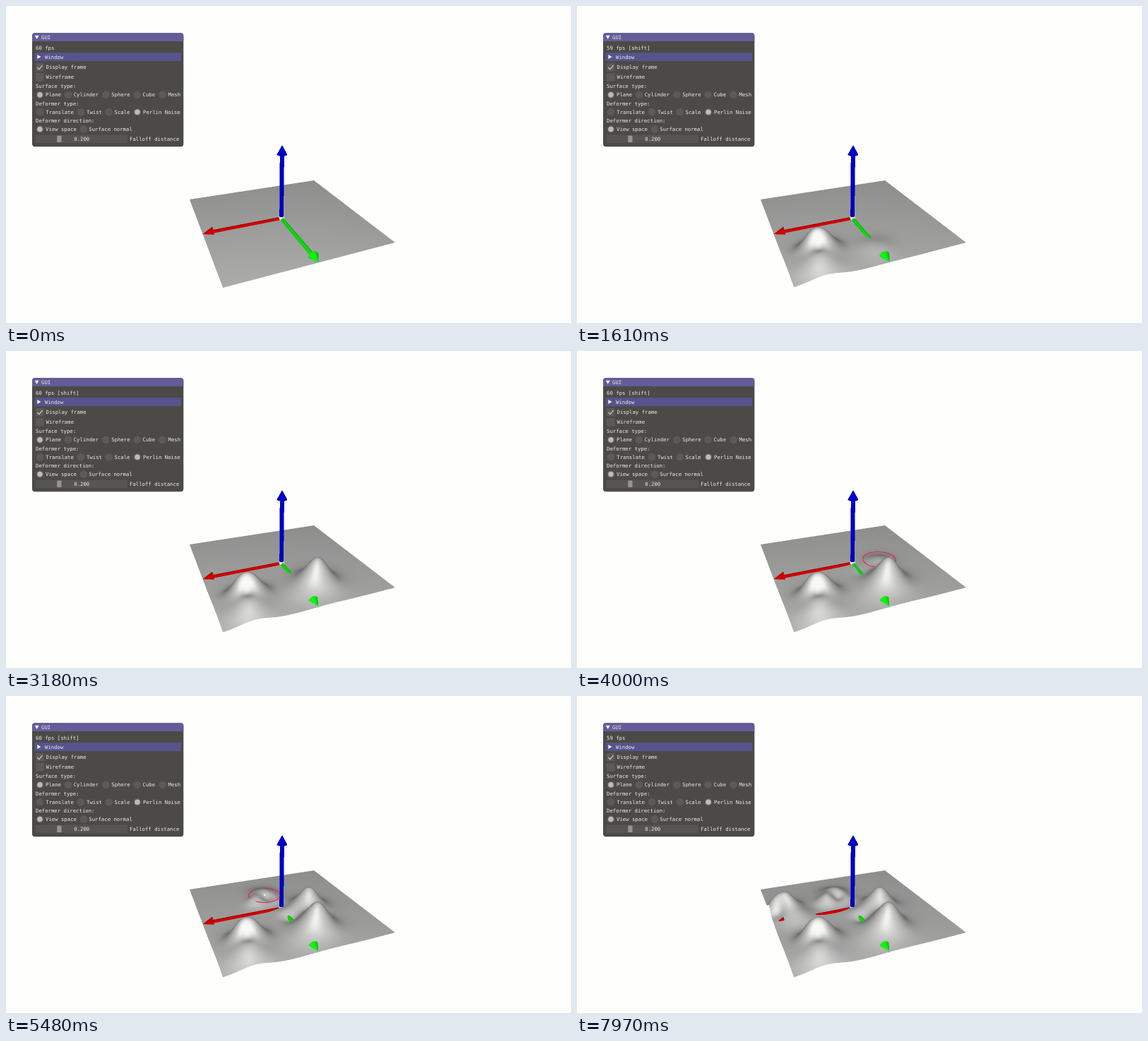
An HTML page with a canvas that plays this animation: 800 px wide and 449 px high, repeating every 8000 ms.

```html
<!DOCTYPE html>
<html lang="en">
<head>
<meta charset="utf-8">
<title>Surface deformer</title>
<style>
html, body { margin: 0; width: 100%; height: 100%; overflow: hidden; background: #fefefd; }
canvas { display: block; }
</style>
</head>
<body>
<canvas id="stage" width="800" height="449"></canvas>
<script>
const LOOP = 8000, N = 110;
const ctx = document.getElementById('stage').getContext('2d');

// 3D view, rendered at double size
const OX = 240, OY = 185, S = 2, VW = 330 * S, VH = 225 * S;
const view = document.createElement('canvas');
view.width = VW; view.height = VH;
const vctx = view.getContext('2d');
const img = vctx.createImageData(VW, VH);
const pix = new Uint32Array(img.data.buffer);
const depth = new Float32Array(VW * VH);
const CAM = [1.53, 3.5, 2.13];

const clamp = (x, a, b) => x < a ? a : x > b ? b : x;
const ease = (t, a, b) => { const p = clamp((t - a) / (b - a), 0, 1); return p * p * (3 - 2 * p); };

// Hills: growth interval and gaussian blobs [u, v, height, radius]
const peak = (u, v, h, r) => [[u, v, h * .77, r], [u, v, h * .23, r * 1.65]];
const hills = [
  { from: 700, to: 1640, blobs: [
    [.56, .545, .19, .15], [.71, .53, .14, .13], [.69, .8, .12, .2],
    [.66, .66, -.07, .085], [.62, .6, .05, .3], [0, .69, .042, .2]] },
  { from: 2370, to: 3150, blobs: peak(-.21, .568, .325, .17) },
  { from: 3780, to: 4440, blobs: [
    ...peak(-.33, .11, .3, .17), [0, .12, .03, .11], [0, .32, -.035, .1]] },
  { from: 4970, to: 5750, blobs: [
    [.1, -.44, .12, .19], [.26, -.27, .09, .13], [.02, -.24, .05, .13], [.1, -.28, -.07, .09]] },
  { from: 6620, to: 7420, blobs: [
    [.8, -.26, .21, .15], [.95, -.28, .09, .1], [.72, -.02, .08, .19],
    [.9, -.14, -.05, .08], [.74, -.3, .04, .28]] }
];
const heightOf = (hill, u, v) => hill.blobs.reduce((s, [a, b, h, r]) =>
  s + h * Math.exp(-((u - a) ** 2 + (v - b) ** 2) / (r * r)), 0);

const M = N + 1, STEP = 2 / N;
const coord = i => -1 + i * STEP;
for (const hill of hills) {
  hill.grid = Float32Array.from({ length: M * M },
    (_, k) => heightOf(hill, coord(k % M), coord(k / M | 0)));
}
const heights = new Float32Array(M * M);
const verts = Array.from({ length: M * M }, () => [0, 0, 0, 0]);

// Cursor path: [time, u, v]
const path = [
  [400, .4, .45], [700, .608, .599], [1660, .608, .599], [2300, -.2485, .5836],
  [3200, -.2485, .5836], [3700, -.33, .11], [4430, -.33, .11], [4670, -.476, -.774],
  [4950, .106, -.345], [5770, .106, -.345], [6240, .74, -.527], [6560, .8, -.25], [7500, .8, -.25]
];

function project(u, v, h, out) {
  const w = 1 - .09 * u - .196 * v - .0781 * h;
  out[0] = ((390 - 136.6 * u - 34.1 * v - 29.5 * h) / w - OX) * S;
  out[1] = ((301.3 - 7.3 * u - 9.08 * v - 119.7 * h) / w - OY) * S;
  out[2] = 1 / w;
  return out;
}

// Cosine between a normal and the direction to the camera
function facing(x, y, z, nx, ny, nz) {
  const a = CAM[0] - x, b = CAM[1] - y, c = CAM[2] - z;
  return Math.max(0, (a * nx + b * ny + c * nz) /
    Math.sqrt((a * a + b * b + c * c) * (nx * nx + ny * ny + nz * nz)));
}

const shade = ([r, g, b], i) =>
  (255 << 24 | Math.min(255, b * i) << 16 | Math.min(255, g * i) << 8 | Math.min(255, r * i)) >>> 0;

function triangle(a, b, c, color) {
  const bx = b[0] - a[0], by = b[1] - a[1], cx = c[0] - a[0], cy = c[1] - a[1];
  const area = bx * cy - by * cx;
  if (!area) return;
  const x0 = Math.max(0, Math.floor(Math.min(a[0], b[0], c[0]) - .5));
  const x1 = Math.min(VW - 1, Math.ceil(Math.max(a[0], b[0], c[0])));
  const y0 = Math.max(0, Math.floor(Math.min(a[1], b[1], c[1]) - .5));
  const y1 = Math.min(VH - 1, Math.ceil(Math.max(a[1], b[1], c[1])));
  for (let y = y0; y <= y1; y++) {
    const py = y + .5 - a[1];
    for (let x = x0; x <= x1; x++) {
      const px = x + .5 - a[0];
      const p = (px * cy - py * cx) / area, q = (bx * py - by * px) / area, o = 1 - p - q;
      if (p < -1e-5 || q < -1e-5 || o < -1e-5) continue;
      const z = o * a[2] + p * b[2] + q * c[2], k = y * VW + x;
      if (z <= depth[k]) continue;
      depth[k] = z;
      pix[k] = shade(color, o * a[3] + p * b[3] + q * c[3]);
    }
  }
}

function quad(a, b, c, d, color) {
  triangle(a, b, c, color);
  triangle(b, d, c, color);
}

function drawSurface(t) {
  heights.fill(0);
  for (const hill of hills) {
    const amp = ease(t, hill.from, hill.to);
    if (amp) for (let k = 0; k < heights.length; k++) heights[k] += amp * hill.grid[k];
  }
  for (let j = 0; j < M; j++) for (let i = 0; i < M; i++) {
    const k = j * M + i, u = coord(i), v = coord(j), h = heights[k];
    const l = Math.max(i - 1, 0), r = Math.min(i + 1, N), d = Math.max(j - 1, 0), e = Math.min(j + 1, N);
    const du = (heights[j * M + r] - heights[j * M + l]) / ((r - l) * STEP);
    const dv = (heights[e * M + i] - heights[d * M + i]) / ((e - d) * STEP);
    const f = facing(u, v, h, -du, -dv, 1);
    project(u, v, h, verts[k])[3] = .38 + .46 * f + .14 * f ** 18;
  }
  for (let j = 0; j < N; j++) for (let i = 0; i < N; i++) {
    const k = j * M + i;
    quad(verts[k], verts[k + 1], verts[k + M], verts[k + M + 1], [255, 255, 254]);
  }
}

// Solid of revolution around one axis; profile holds [position, radius]
function revolve(axis, profile, color, origin = [0, 0, 0]) {
  const SEG = 18, e1 = (axis + 1) % 3, e2 = (axis + 2) % 3;
  const vertex = (t, r, ang, na, nr) => {
    const p = [...origin], n = [0, 0, 0], c = Math.cos(ang), s = Math.sin(ang);
    p[axis] += t; p[e1] += r * c; p[e2] += r * s;
    n[axis] = na; n[e1] = nr * c; n[e2] = nr * s;
    return [...project(...p, []), .6 + .4 * facing(...p, ...n)];
  };
  for (let k = 1; k < profile.length; k++) {
    const [t0, r0] = profile[k - 1], [t1, r1] = profile[k], na = r0 - r1, nr = t1 - t0;
    for (let s = 0; s < SEG; s++) {
      const a = s / SEG * 2 * Math.PI, b = (s + 1) / SEG * 2 * Math.PI;
      quad(vertex(t0, r0, a, na, nr), vertex(t0, r0, b, na, nr),
        vertex(t1, r1, a, na, nr), vertex(t1, r1, b, na, nr), color);
    }
  }
}

const ball = r => Array.from({ length: 9 }, (_, i) =>
  [-r * Math.cos(i * Math.PI / 8), r * Math.sin(i * Math.PI / 8)]);

function drawFrame() {
  [[215, 0, 0], [20, 250, 20], [0, 0, 212]].forEach((color, axis) =>
    revolve(axis, [[0, .026], [.88, .026], [.88, .063], [1, 0]], color));
  revolve(2, ball(.046), [240, 240, 236]);
}

function drawCursor(t) {
  const n = path.findIndex(p => p[0] > t);
  if (n < 1) return;
  const [t0, u0, v0] = path[n - 1], [t1, u1, v1] = path[n], p = ease(t, t0, t1);
  const u = u0 + (u1 - u0) * p, v = v0 + (v1 - v0) * p;
  const ground = hills.reduce((s, h) => s + ease(t, h.from, h.to) * heightOf(h, u, v), 0);
  const lift = clamp(ground, 0, .05) + .004;
  revolve(2, ball(.017), [255, 255, 255], [u, v, lift]);
  const q = [], red = shade([225, 45, 65], 1);
  for (let i = 0; i < 420; i++) {
    const a = i / 210 * Math.PI;
    project(u + .212 * Math.cos(a), v + .212 * Math.sin(a), lift, q);
    const x = Math.round(q[0] - 1), y = Math.round(q[1] - 1);
    for (let d = 0; d < 4; d++) {
      const k = (y + (d >> 1)) * VW + x + (d & 1);
      if (q[2] + .002 > depth[k]) pix[k] = red;
    }
  }
}

// Panel
function box(x, y, w, h, color, r = 0) {
  ctx.fillStyle = color;
  ctx.beginPath();
  ctx.roundRect(x, y, w, h, r);
  ctx.fill();
}
function disc(x, y, r, color) {
  ctx.fillStyle = color;
  ctx.beginPath();
  ctx.arc(x, y, r, 0, 7);
  ctx.fill();
}
function poly(color, ...pts) {
  ctx.fillStyle = color;
  ctx.beginPath();
  pts.forEach(p => ctx.lineTo(...p));
  ctx.fill();
}
function label(str, x, y) {
  ctx.fillStyle = '#ecebe8';
  ctx.fillText(str, x, y + 2.6);
}
function radios(y, chosen, items) {
  items.forEach(([str, cx, tx], i) => {
    disc(cx, y, 5.4, '#5b5a57');
    if (i === chosen) disc(cx, y, 3.8, '#bcbbb7');
    label(str, tx, y);
  });
}

function status(t) {
  const fps = t < 600 ? 60 : t < 1750 ? 59 : t < 5850 ? 60 : t < 6080 ? 59
    : t < 6800 ? 60 : t < 7100 ? 61 : t < 7500 ? 60 : 59;
  return fps + ' fps' + (t >= 400 && t < 7500 ? ' [shift]' : '');
}

function drawPanel(t) {
  ctx.font = '7.3px "DejaVu Sans Mono", monospace';
  box(37, 38.3, 214.3, 160.9, '#4b4a47', 4);
  box(37, 38.3, 214.3, 11.8, '#635c98', [4, 4, 0, 0]);
  poly('#f4f4f4', [40.7, 41.8], [46.7, 41.8], [43.7, 47]);
  label('GUI', 50, 44.5);
  label(status(t), 42, 59.5);
  box(40.5, 66, 207.5, 12, '#57538c');
  poly('#f4f4f4', [44.3, 69], [49.5, 72], [44.3, 75]);
  label('Window', 55, 72);
  box(42, 81, 11.6, 11.6, '#5b5a57');
  ctx.strokeStyle = '#bcbbb7';
  ctx.lineWidth = 1.4;
  ctx.beginPath();
  ctx.moveTo(44.3, 87); ctx.lineTo(46.8, 89.6); ctx.lineTo(51.6, 84);
  ctx.stroke();
  label('Display frame', 56.5, 86.5);
  box(42, 95, 11.6, 11.6, '#5b5a57');
  label('Wireframe', 56.5, 100.8);
  label('Surface type:', 42, 113.3);
  radios(125.8, 0, [['Plane', 48, 56], ['Cylinder', 88, 95.7], ['Sphere', 141.3, 149.3],
    ['Cube', 185.6, 193.5], ['Mesh', 221.5, 229.5]]);
  label('Deformer type:', 42, 138);
  radios(150.2, 3, [['Translate', 48, 56.3], ['Twist', 106, 114], ['Scale', 145.7, 153.5],
    ['Perlin Noise', 186, 194]]);
  label('Deformer direction:', 42, 162);
  radios(174.5, 0, [['View space', 48, 56], ['Surface normal', 110, 117.3]]);
  box(42, 182.7, 130, 11.4, '#565552');
  box(72.3, 183.6, 6.2, 9.4, '#969591');
  label('0.200', 96.3, 188.3);
  label('Falloff distance', 175, 188.3);
}

function render() {
  const t = performance.now() % LOOP;
  pix.fill(0);
  depth.fill(0);
  drawSurface(t);
  drawFrame();
  drawCursor(t);
  vctx.putImageData(img, 0, 0);
  ctx.fillStyle = '#fefefd';
  ctx.fillRect(0, 0, 800, 449);
  ctx.drawImage(view, OX, OY, VW / S, VH / S);
  drawPanel(t);
  requestAnimationFrame(render);
}
render();
</script>
</body>
</html>
```
